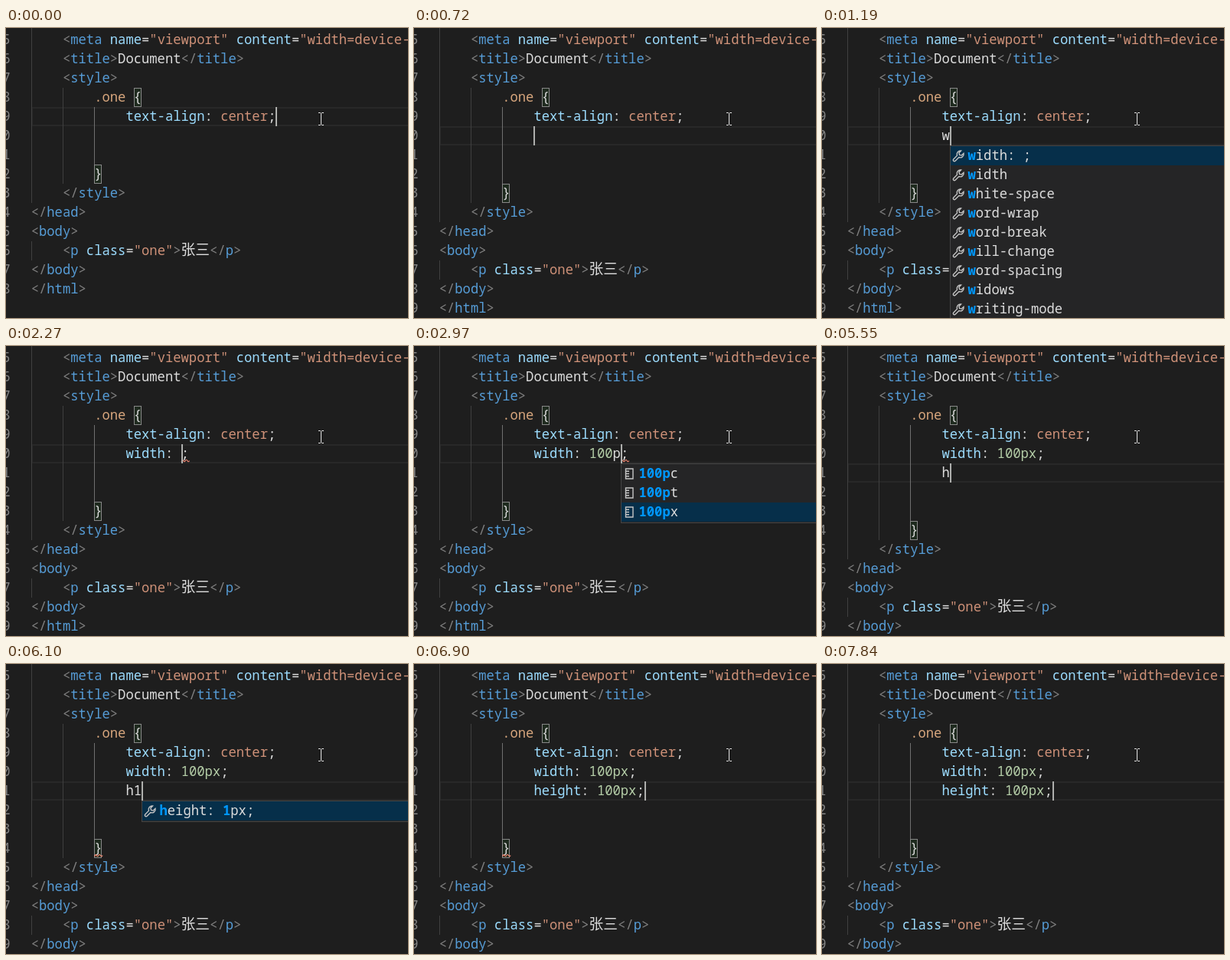
Write an HTML page that moves like this. It is 525 px wide and 378 px high and loops after 7990 ms.

```html
<!DOCTYPE html>
<html lang="en">
<head>
<meta charset="utf-8">
<title>Typing CSS in an editor</title>
<style>
  html, body { margin: 0; width: 100%; height: 100%; overflow: hidden; background: #1e1e1e; }
  svg { display: block; }
  text { font: 500 17.18px "Noto Sans Mono", "DejaVu Sans Mono", monospace; white-space: pre; }
  .cjk { font: 300 18.75px "Noto Sans CJK SC", "Noto Sans CJK", sans-serif; }
  .hit { font-weight: 700; }
</style>
</head>
<body>
<svg id="stage" width="525" height="378" viewBox="0 0 525 378"></svg>
<script>
const LOOP = 7990, CHAR = 10.31, ROW = 25, LEFT = 33.2, TOP = 3;
const COLORS = {
  g: '#808080', b: '#569cd6', a: '#9cdcfe', s: '#ce9178', d: '#dcdcdc',
  y: '#d7a67d', n: '#b5cea8', c: '#dcdcdc', h: '#0097fb'
};
const colX = col => LEFT + col * CHAR;
const rowY = row => TOP + row * ROW;
const esc = s => s.replace(/&/g, '&amp;').replace(/</g, '&lt;');
const rect = (x, y, w, h, fill, more = '') =>
  `<rect x="${x}" y="${y}" width="${w}" height="${h}" fill="${fill}" ${more}/>`;
const label = (x, y, s, fill, cls = '') =>
  `<text x="${x - .5}" y="${y}" fill="${fill}" class="${cls}">${esc(s)}</text>`;

// Markup: "~" plus a colour key starts each run
function line(x, y, markup) {
  return markup.split('~').slice(1).map(run => {
    const key = run[0], s = run.slice(1);
    const out = label(x, y, s, COLORS[key], { c: 'cjk', h: 'hit' }[key]);
    x += s.length * (key === 'c' ? 18.75 : CHAR);
    return out;
  }).join('');
}

const tag = (name, end = '') => `~g<${end}~b${name}~g>`;
const HEAD = [
  [4, '~g<~bmeta~a name~d=~s"viewport"~a content~d=~s"width=device-width'],
  [4, tag('title') + '~dDocument' + tag('title', '/')],
  [4, tag('style')],
  [8, '~y.one~d {'],
  [12, '~atext-align~d: ~scenter~d;']
];
const TAIL = [
  [0, ''], [0, ''],
  [8, '~d}'],
  [4, tag('style', '/')],
  [0, tag('head', '/')],
  [0, tag('body')],
  [4, '~g<~bp~a class~d=~s"one"~g>~c张三' + tag('p', '/')],
  [0, tag('body', '/')],
  [0, tag('html', '/')]
];

const list = (col, icon, items, pick = 0) => ({ col, icon, items, pick });
const wItems = ['idth: ;', 'idth', 'hite-space', 'ord-wrap', 'ord-break', 'ill-change',
  'ord-spacing', 'idows', 'riting-mode'].map(s => '~hw~d' + s);
const hItems = ['~hh~deight: ;', '~hh~deight', '~hh~dyphens', '~dline-~hh~deight',
  '~dmax-~hh~deight', '~dmin-~hh~deight', '~hh~danging-punctuation', '~d-ms-~hh~dyphens'];
const units = list(23, 'ruler', ['~h100p~dc', '~h100p~dt', '~h100p~dx'], 2);
const emmet = n => list(14, 'wrench', [`~hh~deight: ~h${n}~dpx;`]);

const width = v => `~awidth~d: ${v}~d;`;
const DONE = width('~n100px');

// Each step changes part of the state from its time on
const STEPS = [
  [0, { lines: [], row: 4, col: 31, caret: true, popup: null, semi: 0, brace: false }],
  [250, { caret: false }],
  [720, { lines: [''], row: 5, col: 12, caret: true }],
  [1020, { lines: ['~dw'], col: 13 }],
  [1190, { popup: list(13, 'wrench', wItems) }],
  [1360, { lines: [width('')], col: 19, popup: null }],
  [1810, { caret: false, semi: 19 }],
  [2270, { caret: true }],
  [2350, { lines: [width('~n1')], col: 20, semi: 20 }],
  [2500, { lines: [width('~n10')], col: 21, semi: 21 }],
  [2670, { lines: [width('~n100')], col: 22, semi: 22 }],
  [2970, { lines: [width('~n100~dp')], col: 23, semi: 23, popup: units }],
  [3050, { lines: [width('~n100~dpx')], col: 24, semi: 24 }],
  [3140, { lines: [DONE], popup: list(23, 'ruler', ['~h100px']) }],
  [3600, { caret: false, semi: 0 }],
  [3830, { lines: [width('~d100px')], popup: null }],
  [3920, { lines: [DONE] }],
  [4070, { caret: true }],
  [4150, { col: 25 }],
  [4700, { caret: false }],
  [5100, { lines: [DONE, ''], row: 6, col: 12, caret: true }],
  [5550, { lines: [DONE, '~dh'], col: 13 }],
  [5720, { popup: list(13, 'wrench', hItems) }],
  [6020, { lines: [DONE, '~dh1'], col: 14, popup: null, brace: true }],
  [6100, { popup: emmet(1) }],
  [6350, { lines: [DONE, '~dh10'], col: 15 }],
  [6420, { popup: emmet(10) }],
  [6500, { lines: [DONE, '~dh100'], col: 16, popup: emmet(100) }],
  [6900, { lines: [DONE, '~aheight~d: ~n100px~d;'], col: 26, popup: null }],
  [7380, { caret: false, brace: false }],
  [7840, { caret: true }]
];

const ICONS = {
  wrench: 'M10 1.5a4.5 4.5 0 0 0-4 6.2L1.3 12.4a1.6 1.6 0 0 0 2.3 2.3L8.3 10a4.5 4.5 0 0 0 6.2-5L11.8 7.6 9 7 8.4 4.2 11 1.6z',
  ruler: 'M3 1.5h9.5v13H3zM3 4.7h4.5M3 8h4.5M3 11.3h4.5'
};

const guide = (col, from, to, fill) =>
  rect(Math.floor(colX(col)), rowY(from), 1, (to - from) * ROW, fill);

const bracket = (col, row) =>
  rect(Math.floor(colX(col)) + .5, rowY(row) + .5, 9, 24, '#1e2a1e', 'stroke="#888"');

const squiggle = (col, row) =>
  `<path d="M${colX(col)} ${rowY(row) + 23}q1.3-4 2.6-1.5t2.6 0 2.6 0 2.6 0" fill="none" stroke="#f48771" stroke-width="1.2"/>`;

function drawPopup({ col, icon, items, pick }, row) {
  const x = Math.floor(colX(col)), y = rowY(row + 1);
  const rows = items.map((item, i) => {
    const top = y + 1 + i * ROW;
    return (i === pick ? rect(x + 1, top, 525, ROW, '#062f4a') : '') +
      `<path transform="translate(${x + 3.5} ${top + 4.5})" d="${ICONS[icon]}" fill="none" stroke="#c5c5c5" stroke-width="1.4"/>` +
      line(x + 24, top + 18, item);
  });
  return rect(x + .5, y + .5, 540, items.length * ROW + 2, '#252526', 'stroke="#454545"') + rows.join('');
}

function draw(s) {
  const n = s.lines.length, close = 7 + n;
  const rows = [...HEAD, ...s.lines.map(l => [12, l]), ...TAIL];
  let out = rect(34, rowY(s.row) + 1, 520, 23, 'none', 'stroke="#282828" stroke-width="2"');
  out += guide(0, -1, close + 2, '#404040') + guide(0, close + 4, close + 5, '#404040');
  out += guide(4, 3, close + 1, '#404040') + guide(8, 4, close, '#707070');
  out += bracket(13, 3) + bracket(8, close);
  rows.forEach(([indent, markup], i) => {
    const y = rowY(i) + 18;
    out += label(-4.3, y, String((i + 5) % 10), '#858585');
    out += line(colX(indent), y, markup);
  });
  if (s.semi) out += squiggle(s.semi, 5);
  if (s.brace) out += squiggle(8, close);
  if (s.caret) out += rect(Math.floor(colX(s.col)), rowY(s.row), 2, ROW, '#aeafad');
  if (s.popup) out += drawPopup(s.popup, s.row);
  // mouse pointer
  out += '<path d="M408 110.5h2.5l1 1 1-1h2.5M411.5 111v15M408 126.5h2.5l1-1 1 1h2.5" fill="none" stroke="#e4e4e4"/>';
  document.getElementById('stage').innerHTML = out;
}

let shown = 0;
const start = performance.now();
function tick() {
  const t = (performance.now() - start) % LOOP;
  const past = STEPS.filter(([at]) => at <= t);
  if (past.length !== shown) {
    shown = past.length;
    draw(Object.assign({}, ...past.map(step => step[1])));
  }
  requestAnimationFrame(tick);
}
tick();
</script>
</body>
</html>
```
